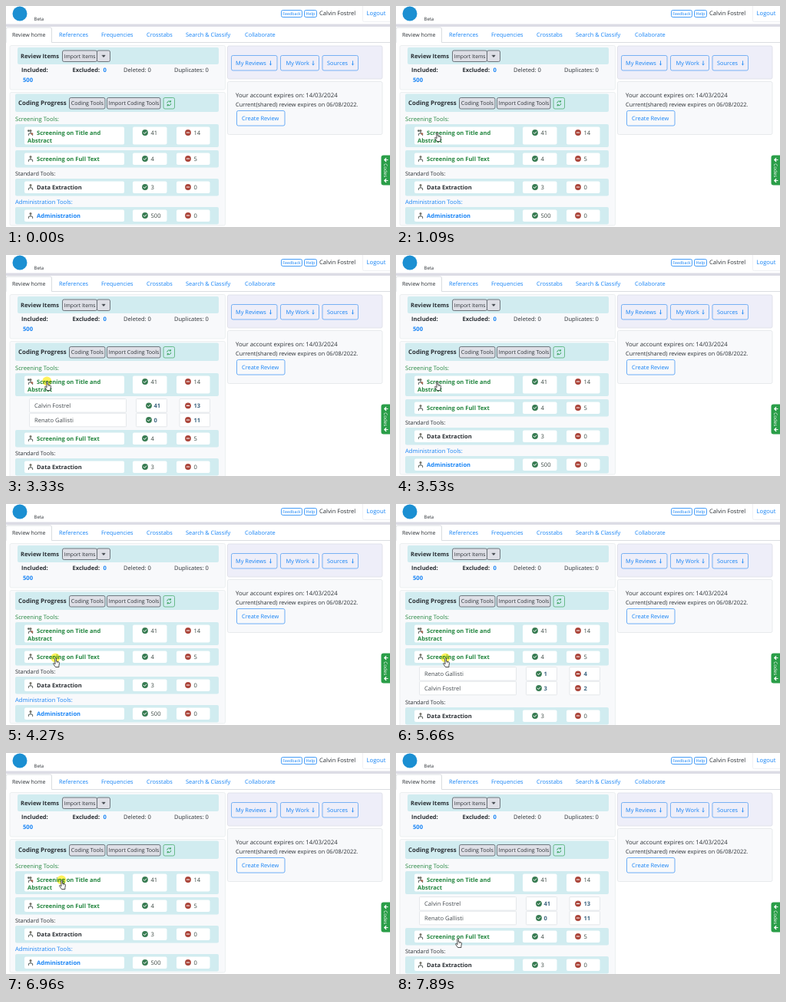
An HTML page that plays this animation: 500 px wide and 288 px high, repeating every 8000 ms.

```html
<!DOCTYPE html>
<html lang="en">
<head>
<meta charset="utf-8">
<title>Review home</title>
<style>
  html, body { margin: 0; width: 100%; height: 100%; overflow: hidden; background: #fff; }
  svg { display: block; width: 100vw; height: 100vh; }
  text { font-family: "Open Sans", "Noto Sans", sans-serif; text-rendering: geometricPrecision; white-space: pre; }
</style>
</head>
<body>
<svg id="stage" viewBox="0 0 500 288" preserveAspectRatio="none"></svg>
<script>
const BLUE = '#1683f5', GREEN = '#23863f', INK = '#2b3035', CYAN = '#d1ecf0';
const PANEL = '#f8f9fb', LINE = '#dfe3e6', WHITE = '#fff';
const GREY = '#dedfe6', EDGE = '#555b62';
const stage = document.getElementById('stage');

function el(parent, tag, attrs) {
  const node = document.createElementNS('http://www.w3.org/2000/svg', tag);
  for (const key in attrs) node.setAttribute(key, attrs[key]);
  parent.appendChild(node);
  return node;
}
const group = (parent = stage) => el(parent, 'g', {});

// Corners are given as left, top, right, bottom.
function box(parent, l, t, r, b, fill, stroke = 'none', rx = 2, weight = 0.8) {
  return el(parent, 'rect', { x: l, y: t, width: r - l, height: b - t, rx, fill, stroke, 'stroke-width': weight });
}
function path(parent, d, stroke, weight = 1, fill = 'none') {
  return el(parent, 'path', { d, stroke, fill, 'stroke-width': weight, 'stroke-linecap': 'round', 'stroke-linejoin': 'round' });
}
// mid is the vertical middle of the capitals.
function label(parent, str, x, mid, size = 7.6, fill = INK, weight = 400) {
  const node = el(parent, 'text', { x, y: mid + size * 0.36, 'font-size': size, fill, 'font-weight': weight });
  node.textContent = str;
  return node;
}
const bold = (parent, str, x, mid, size = 7.55, fill = INK) => label(parent, str, x, mid, size, fill, 700);
function button(l, t, r, b, str, x, size, fill, stroke, ink) {
  box(stage, l, t, r, b, fill, stroke, 2);
  label(stage, str, x, (t + b) / 2, size, ink);
}

function tick(parent, x, y) {
  el(parent, 'circle', { cx: x, cy: y, r: 3.9, fill: '#387c52' });
  path(parent, `M${x - 1.8} ${y + 0.1}l1.3 1.3 2.3-2.5`, WHITE, 1);
}
function minus(parent, x, y) {
  el(parent, 'circle', { cx: x, cy: y, r: 3.9, fill: '#ab453a' });
  path(parent, `M${x - 1.7} ${y}h3.4`, WHITE, 1.2);
}
function person(parent, x, y, pair) {
  el(parent, 'circle', { cx: x, cy: y - 2.6, r: 1.5, fill: '#77756a' });
  path(parent, `M${x} ${y - 1}v2M${x - 2.6} ${y + 3.4}v-1.6l2.6-1.2 2.6 1.2v1.6`, '#69706c', 1.1);
  if (!pair) return;
  el(parent, 'circle', { cx: x - 2.6, cy: y - 2.4, r: 1.4, fill: '#5b655f' });
  el(parent, 'circle', { cx: x + 1.8, cy: y + 1.6, r: 1.4, fill: '#a8654f' });
}

function codingRow(parent, y, lines, done, open, fill) {
  const bottom = y + (lines.length > 1 ? 15.5 : 8);
  box(parent, 12, y - 11, 277, bottom + 3.5, CYAN);
  for (const [l, r] of [[24, 154], [165, 209.5], [222, 265.5]]) box(parent, l, y - 7.5, r, bottom, WHITE);
  person(parent, 32, y, lines.length > 1);
  lines.forEach((str, i) => bold(parent, str, i ? 28 : 40, y + i * 10, 7.55, fill));
  tick(parent, 181, y);
  minus(parent, 237, y);
  label(parent, done, 188.5, y, 7.6, '#3a4742');
  label(parent, open, 244.5, y, 7.6, '#3a4742');
}
function personRow(parent, y, name, done, open) {
  for (const [l, r] of [[30.5, 156.5], [169.5, 209.5], [226, 265.5]]) box(parent, l, y - 8.8, r, y + 8.8, WHITE, LINE, 1);
  label(parent, name, 37, y, 7.6, '#454b50');
  tick(parent, 186, y);
  minus(parent, 237, y);
  bold(parent, done, 192.5, y, 7.5, '#3d6580');
  bold(parent, open, 244.5, y, 7.5, '#3d6580');
}

// Header
box(stage, 0, 23.5, 500, 27, '#dcdce5', 'none', 0);
el(stage, 'circle', { cx: 18, cy: 10, r: 9.5, fill: '#1b8fd2' });
label(stage, 'Beta', 36.5, 17, 6);
button(358.5, 5.5, 385.5, 14.5, 'Feedback', 360.3, 5.3, WHITE, BLUE, BLUE);
button(388.5, 5.5, 404.5, 14.5, 'Help', 390.5, 5.5, WHITE, BLUE, BLUE);
label(stage, 'Calvin Fostrel', 408, 9.5, 7.6);
button(464.5, -3, 503, 20.5, 'Logout', 469.5, 7.7, WHITE, '#eceef1', BLUE);

// Tabs
path(stage, 'M0 47.5V30q0-2 2-2H57.5q2 0 2 2V47.5H500', '#d6dade', 0.9);
[['Review home', 8, 7], ['References', 69, 7.4], ['Frequencies', 124, 7.4], ['Crosstabs', 183, 7.4],
 ['Search & Classify', 234, 7.4], ['Collaborate', 311, 7.4]]
  .forEach(([str, x, size], i) => label(stage, str, x, 37.7, size, i ? BLUE : INK));

// Review items
box(stage, 5, 51.5, 285.5, 109, PANEL, '#e9ecee');
box(stage, 15, 54, 277, 76, CYAN);
bold(stage, 'Review Items', 19, 64.8);
button(73.5, 58, 118.5, 72.5, 'Import Items', 75.5, 6.8, GREY, EDGE, INK);
box(stage, 118.5, 58, 135.5, 72.5, GREY, EDGE);
path(stage, 'M125.2 64.2h4l-2 2.4z', INK, 0.4, INK);
bold(stage, 'Included:', 20, 83.3);
bold(stage, '500', 22, 96, 7.6, BLUE);
bold(stage, 'Excluded:', 86.5, 83.3);
bold(stage, '0', 126.5, 83.3, 7.6, BLUE);
label(stage, 'Deleted: 0', 153, 83.3, 7.6);
label(stage, 'Duplicates: 0', 219, 83.3, 7.5);

// Right column
box(stage, 288.5, 52, 490, 95, '#eeeef9', '#dcdde6');
[[293.5, 353, 'My Reviews', 299, 344.5], [357.5, 407.5, 'My Work', 364.5, 400], [412, 458.5, 'Sources', 418, 451.5]]
  .forEach(([l, r, str, x, arrow]) => {
    button(l, 64.5, r, 84, str, x, 7.4, 'none', '#5ba3f3', BLUE);
    path(stage, `M${arrow} 71.8v5m-1.1-1.1 1.1 1.1 1.1-1.1`, BLUE, 0.8);
  });
box(stage, 288.5, 98.5, 490, 167.5, PANEL, '#e3e6e9');
label(stage, 'Your account expires on: 14/03/2024', 299, 116.5, 7.8);
label(stage, 'Current(shared) review expires on 06/08/2022.', 299, 128, 7.4);
button(300.5, 136.5, 363, 156, 'Create Review', 307, 7.4, 'none', '#4a9bf5', BLUE);

// Side tab
box(stage, 488.5, 194.5, 503, 233.5, '#2a9e48', 'none', 3);
for (const y of [200.5, 227.5]) path(stage, `M497 ${y}h-4.2m2-2-2 2 2 2`, WHITE, 1.2);
label(group(), 'Codes', 0, 0, 6.2, WHITE).parentNode.setAttribute('transform', 'translate(494.5 205.3) rotate(90)');

// Coding progress
const panel = box(stage, 5, 112.5, 285.5, 286, PANEL, '#e9ecee');
box(stage, 12, 114.5, 277, 138, CYAN);
bold(stage, 'Coding Progress', 16, 126, 7.9);
button(82.5, 119.5, 129, 134, 'Coding Tools', 84.8, 7.1, GREY, EDGE, INK);
button(131.5, 119.5, 201, 134, 'Import Coding Tools', 133.6, 7, GREY, EDGE, INK);
box(stage, 205, 119.5, 219.5, 134, 'none', '#4fae72');
path(stage, 'M209.8 126.2a2.6 2.6 0 0 1 4.6-1.3v-1.4m0 1.4h-1.4M214.8 127.4a2.6 2.6 0 0 1-4.6 1.3v1.4m0-1.4h1.4', '#2f9d55', 0.9);
label(stage, 'Screening Tools:', 12, 147, 7.6, GREEN);
codingRow(stage, 165, ['Screening on Title and', 'Abstract'], '41', '14', GREEN);

const titlePeople = group();
personRow(titlePeople, 196.3, 'Calvin Fostrel', '41', '13');
personRow(titlePeople, 215, 'Renato Gallisti', '0', '11');
const fullText = group();
codingRow(fullText, 199, ['Screening on Full Text'], '4', '5', GREEN);
const textPeople = group();
personRow(textPeople, 221.3, 'Renato Gallisti', '1', '4');
personRow(textPeople, 240, 'Calvin Fostrel', '3', '2');
const rest = group();
label(rest, 'Standard Tools:', 12, 218, 7.3);
codingRow(rest, 236, ['Data Extraction'], '3', '0', INK);
label(rest, 'Administration Tools:', 12, 255, 7.6, BLUE);
codingRow(rest, 273, ['Administration'], '500', '0', BLUE);

// Pointer
const halo = el(stage, 'circle', { r: 6, fill: '#fff25a', style: 'mix-blend-mode:multiply' });
const hand = group();
path(hand, 'M2.8 1.4q.8-1.5 1.6 0V5l2.9.7q1.3.4 1.2 1.7l-.6 3V12.5H3.5L.6 8.3q-.1-1.1 1-.9l1.2 1z', '#222', 0.8, WHITE);
path(hand, 'M5.2 5.4v1.6M6.7 5.8v1.4', '#444', 0.5);

const LOOP = 8000, SHOW = 630;
const HOME = [247, 222];
// start, step length, steps, x, y
const MOVES = [
  [722, 92, 5, 50, 164],
  [3790, 96, 5, 61, 200],
  [6300, 90, 1, 61, 199],
  [6480, 93, 4, 69, 165],
  [7510, 95, 5, 77, 241]
];
const CLICKS = [[2040, 2220], [3330, 3530], [4270, 4450], [5660, 5940], [6960, 7040]];
// 1 opens the first row, 2 the second
const OPEN = [[0, 0], [2220, 1], [3530, 0], [4450, 2], [5940, 0], [7040, 1]];

const smooth = u => u * u * (3 - 2 * u);
const show = (node, on) => node.setAttribute('visibility', on ? 'visible' : 'hidden');
const shift = (node, x, y) => node.setAttribute('transform', `translate(${x} ${y})`);

function pointerAt(t) {
  let [x, y] = HOME;
  for (const [start, dt, n, tx, ty] of MOVES) {
    if (t < start) break;
    const u = smooth(Math.min(Math.floor((t - start) / dt) + 1, n) / n);
    x += (tx - x) * u;
    y += (ty - y) * u;
  }
  return [Math.round(x), Math.round(y)];
}

function draw(t) {
  const open = OPEN.filter(([at]) => t >= at).pop()[1];
  show(titlePeople, open === 1);
  show(textPeople, open === 2);
  shift(fullText, 0, open === 1 ? 40 : 0);
  shift(rest, 0, open ? 40 : 0);
  panel.setAttribute('height', open ? 213.5 : 173.5);

  const [x, y] = pointerAt(t);
  shift(hand, x, y);
  show(hand, t >= SHOW);
  shift(halo, x + 3.3, y + 0.5);
  show(halo, CLICKS.some(([from, to]) => t >= from && t < to));
}

const began = performance.now();
function play() {
  draw((performance.now() - began) % LOOP);
  requestAnimationFrame(play);
}
play();
</script>
</body>
</html>
```
